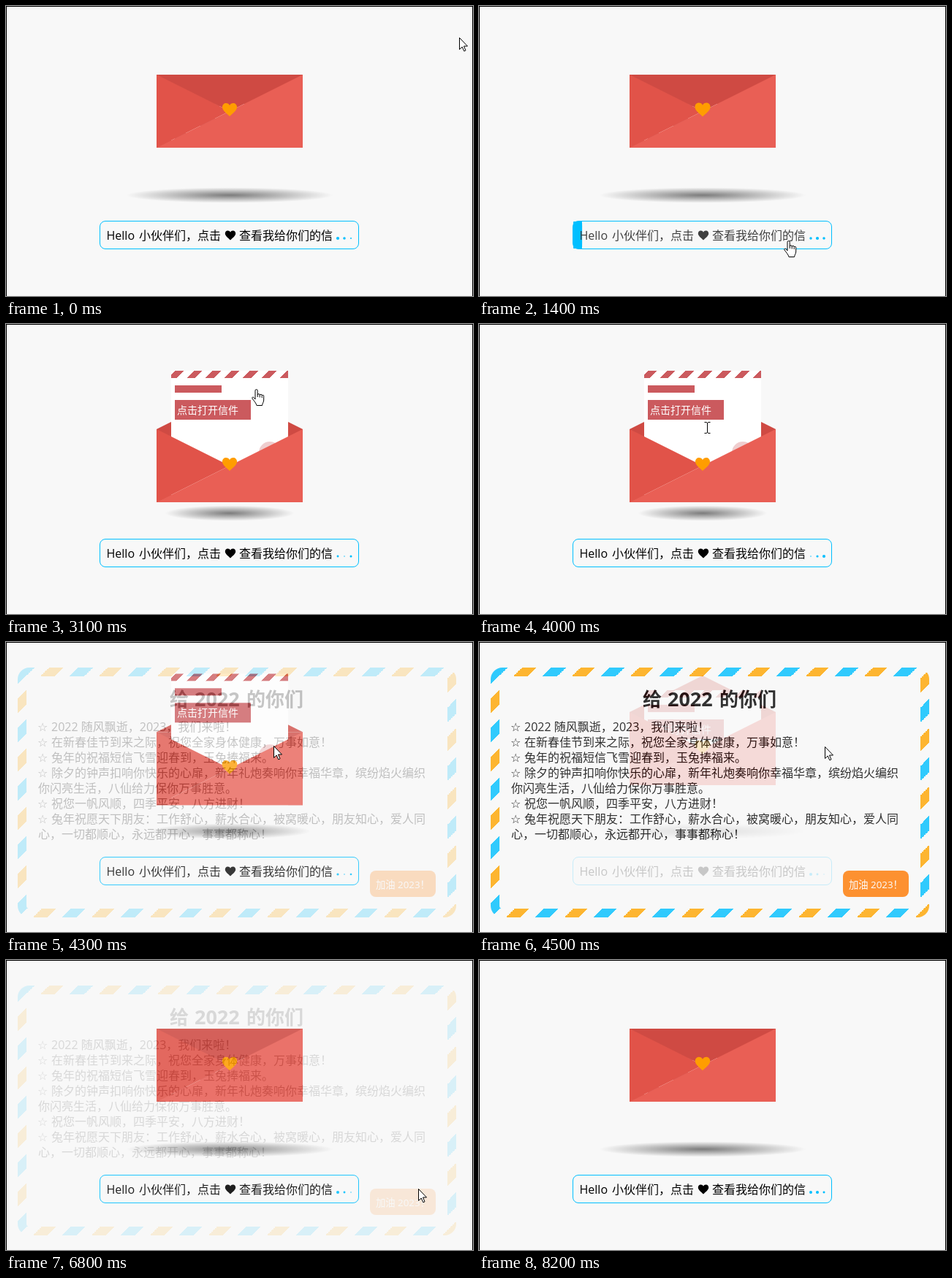
Animation of 639x397 px, one loop 8300 ms. Source, as an HTML page:

```html
<!DOCTYPE html>
<html lang="zh-CN">
<head>
<meta charset="utf-8">
<style>
html, body { margin: 0; width: 100%; height: 100%; overflow: hidden; background: #f8f8f8; }
div, svg { position: absolute; box-sizing: border-box; }
svg { left: 0; top: 0; overflow: visible; }
text { font-family: "Open Sans", "Noto Sans CJK SC", "Noto Sans CJK", sans-serif; font-size: 16px; white-space: pre; }
#frame { inset: 0; border: 1px solid #000; border-bottom: 0; }
#mail { left: 206px; top: 44px; width: 200px; height: 150px; }
#mail > div { border: 0 solid transparent; }
#back { top: 50px; width: 200px; height: 100px; background: #cf4a43; z-index: 0; }
#mail #flap { top: 50px; border-width: 50px 100px 0; border-top-color: #cf4a43; transform-origin: 50% 0; }
#mail #left { top: 50px; border-width: 50px 0 50px 100px; border-left-color: #e15349; z-index: 2; }
#mail #front { top: 50px; border-width: 0 0 100px 200px; border-bottom-color: #e95f55; z-index: 2; }
#letter { left: 20px; bottom: 0; width: 160px; background: #fff; overflow: hidden; z-index: 1; }
#letter div { background: #cb5a5e; left: 5px; }
#letter .stripes { left: 0; width: 160px; height: 10px;
  background: repeating-linear-gradient(-45deg, #cb5a5e, #cb5a5e 8px, transparent 8px, transparent 18px); }
#letter .title { top: 20px; width: 64px; height: 10px; }
#letter .label { top: 40px; width: 104px; height: 27px; }
#letter .stamp { top: 97px; left: 120px; width: 30px; height: 30px; border-radius: 50%; opacity: .3; }
#letter text { font-size: 14px; fill: #fff; }
#shadow { left: 306px; top: 244px; height: 30px; transform: translateX(-50%); border-radius: 50%;
  background: radial-gradient(rgba(0,0,0,.5), rgba(0,0,0,0), rgba(0,0,0,0)); }
#button { left: 128px; top: 294px; width: 355px; height: 39px; border: 1px solid #00bfff; border-radius: 8px; }
#fill { inset: 0; background: #00bfff; border-radius: 8px; }
#dialog { left: 16px; top: 35px; width: 600px; height: 342px; border: 12px solid transparent; border-radius: 16px;
  background: linear-gradient(#f8f8f8, #f8f8f8) padding-box,
    repeating-linear-gradient(-45deg, orange 0 12.5%, transparent 0 25%, #00bfff 0 37.5%, transparent 0 50%) 0 / 80px 80px; }
#page { inset: 0; background: #f8f8f8; }
</style>
</head>
<body>
<div id="shadow"></div>
<div id="mail">
  <div id="back"></div>
  <div id="flap"></div>
  <div id="letter">
    <div class="stripes"></div><div class="title"></div><div class="label"></div><div class="stamp"></div>
    <svg><text x="8" y="59">点击打开信件</text></svg>
  </div>
  <div id="left"></div>
  <div id="front"></div>
  <svg style="z-index:3"><path id="heart" fill="#ff9d00"/></svg>
</div>
<div id="button"><div id="fill"></div></div>
<svg>
  <g id="caption">
    <text x="137.5" y="320">Hello</text>
    <text x="182" y="320">小伙伴们，点击</text>
    <path id="small" transform="translate(307 314) scale(.72)"/>
    <text x="319" y="320">查看我给你们的信</text>
  </g>
  <g id="dots" fill="#00bfff"></g>
</svg>
<div id="page">
  <div id="dialog"></div>
  <svg>
    <g font-weight="bold">
      <text x="224" y="88" style="font-size:26px">给</text>
      <text x="258" y="88" style="font-size:27px">2022</text>
      <text x="329" y="88" style="font-size:26px">的你们</text>
    </g>
    <g id="lines"></g>
    <rect x="498" y="313" width="90" height="36" rx="8" fill="#ff7800"/>
    <text x="506" y="337" fill="#fff" style="font-size:13.33px">加油 2023！</text>
  </svg>
</div>
<div id="frame"></div>
<svg>
  <g id="cursor" fill="#fff" stroke="#000" stroke-linejoin="round">
    <path id="arrow" d="M.5 .5V16.5L4.2 13 6.8 18.8 9 17.8 6.5 12H11.5Z"/>
    <path id="hand" transform="translate(-5 0)" d="M5 14V2.2a1.6 1.6 0 0 1 3.2 0V8a1.5 1.5 0 0 1 3 .5a1.5 1.5 0 0 1 3 .7a1.3 1.3 0 0 1 2.5 1V15C16.7 18 15 19 14.5 22.5H7C6.5 19.5 3 16 .8 12.6C.4 11.4 2 10.5 3 11.6ZM8.2 8V11M11.2 8.5V11.5M14.2 9.5V12"/>
    <path id="beam" fill="none" d="M-3.5 -7.5H-1L.5 -6.5 2 -7.5H4.5M.5 -6.5V6.5M-3.5 7.5H-1L.5 6.5 2 7.5H4.5"/>
  </g>
</svg>
<script>
const LOOP = 8300;
const $ = id => document.getElementById(id);
const lines = [
  '☆2022 随风飘逝，2023，我们来啦！',
  '☆在新春佳节到来之际，祝您全家身体健康，万事如意！',
  '☆兔年的祝福短信飞雪迎春到，玉兔捧福来。',
  '☆除夕的钟声扣响你快乐的心扉，新年礼炮奏响你幸福华章，缤纷焰火编织',
  '你闪亮生活，八仙给力保你万事胜意。',
  '☆祝您一帆风顺，四季平安，八方进财！',
  '☆兔年祝愿天下朋友：工作舒心，薪水合心，被窝暖心，朋友知心，爱人同',
  '心，一切都顺心，永远都开心，事事都称心！'
];
$('lines').innerHTML = lines.map((s, i) => {
  const y = 122 + 21 * i, star = s[0] === '☆';
  return star
    ? `<text x="43" y="${y}" style="font-family:'DejaVu Sans',sans-serif">☆</text><text x="62" y="${y}">${s.slice(1)}</text>`
    : `<text x="44" y="${y}">${s}</text>`;
}).join('');

const heart = 'M0 9C-4 5-10 1-10-3.5C-10-7-7.5-9-5-9C-2.5-9-1-8 0-6C1-8 2.5-9 5-9C7.5-9 10-7 10-3.5C10 1 4 5 0 9Z';
$('heart').setAttribute('d', heart);
$('small').setAttribute('d', heart);
$('dots').innerHTML = [454, 463, 472].map(x => `<circle cx="${x}" cy="318"/>`).join('');
const dots = [...$('dots').children];

// The CSS "ease" curve
function ease(x) {
  if (x <= 0) return 0;
  if (x >= 1) return 1;
  let lo = 0, hi = 1, s;
  for (let i = 0; i < 20; i++) {
    s = (lo + hi) / 2;
    if (.75 * s * (1 - s) + s ** 3 < x) lo = s; else hi = s;
  }
  return .3 * s * (1 - s) ** 2 + 3 * s * s * (1 - s) + s ** 3;
}
const toggle = (t, on, off, dur) => ease((t - on) / dur) - ease((t - off) / dur);

// time, x, y of the pointer's hot spot
const path = [
  [0, 620, 43], [150, 620, 43], [500, 600, 190], [900, 560, 350], [1100, 545, 350],
  [1365, 440, 328], [1400, 422, 321], [1900, 422, 321], [2283, 438, 293], [2400, 446, 272],
  [2500, 454, 248], [2700, 385, 90], [2850, 355, 62], [3300, 330, 110], [3800, 313, 148],
  [4000, 312, 142], [4200, 312, 142], [4500, 473, 143], [5000, 530, 270], [5400, 547, 340],
  [5700, 551, 334], [6550, 551, 334], [7000, 575, 297]
];
function pointer(t) {
  const i = path.findIndex(p => p[0] > t);
  if (i < 0) return path[path.length - 1].slice(1);
  const a = path[i - 1], b = path[i], k = (t - a[0]) / (b[0] - a[0]);
  return [1, 2].map(n => Math.round(a[n] + (b[n] - a[n]) * k));
}
const within = (t, ...spans) => spans.some(([a, b]) => t >= a && t < b);

function draw(t) {
  const on = 2400, off = 4200;
  const lift = toggle(t, on, off, 400);
  $('mail').style.transform = `translateY(${50 * lift}px)`;
  $('shadow').style.width = 400 - 150 * lift + 'px';
  $('letter').style.height = 60 + 120 * toggle(t, on + 200, off + 200, 400) + 'px';
  $('flap').style.transform = `scaleY(${Math.cos(Math.PI * toggle(t, on, off + 400, 400))})`;
  $('flap').style.zIndex = Math.round(2 - 2 * toggle(t, on, off + 400, 200));
  const beat = 1.03 - .03 * Math.cos(t * Math.PI / 500);
  $('heart').setAttribute('transform', `translate(100 98) scale(${beat})`);

  const enter = 1365, leave = 2283;
  $('fill').style.transform = `scaleX(${toggle(t, enter, leave, 700)})`;
  $('fill').style.transformOrigin = t < leave ? 'left' : 'right';
  const ink = Math.round(255 * toggle(t, enter, leave, 200));
  $('caption').setAttribute('fill', `rgb(${ink},${ink},${ink})`);
  dots.forEach((dot, i) => {
    const wave = .5 + .5 * Math.cos(2 * Math.PI * (t / 1150 - i * .21));
    dot.setAttribute('r', .7 + 1.4 * wave ** .6);
  });

  $('page').style.opacity = toggle(t, off, 6450, 600);

  const hand = within(t, [enter, leave], [2600, 3900], [5350, 6550]);
  const beam = within(t, [3900, off]);
  $('hand').style.display = hand ? '' : 'none';
  $('beam').style.display = beam ? '' : 'none';
  $('arrow').style.display = hand || beam ? 'none' : '';
  $('cursor').style.display = t < 7250 ? '' : 'none';
  $('cursor').setAttribute('transform', `translate(${pointer(t)})`);
}

const start = performance.now();
function tick() {
  draw((performance.now() - start) % LOOP);
  requestAnimationFrame(tick);
}
tick();
</script>
</body>
</html>
```
